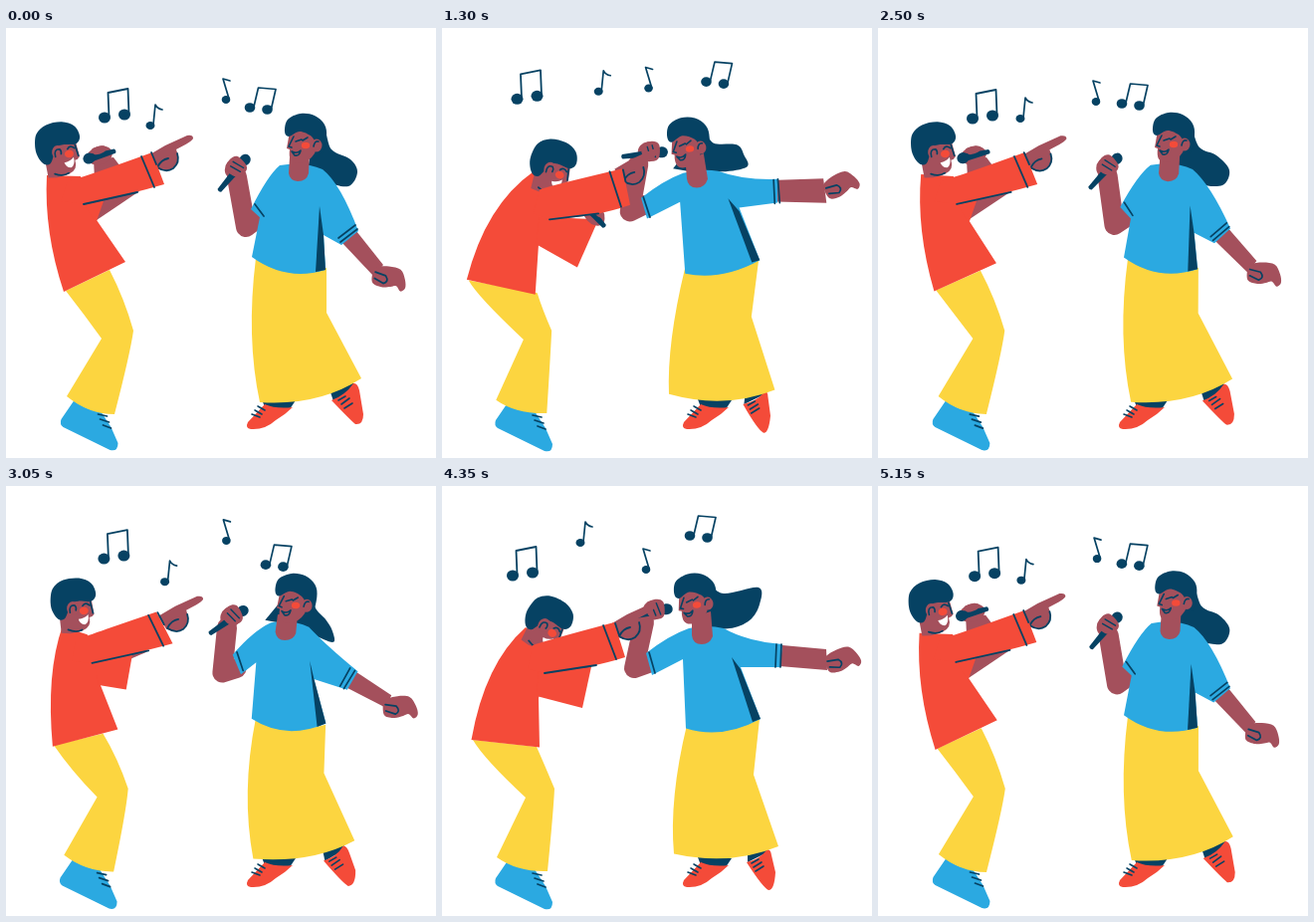
Animation, 432 px wide and 432 px high, one loop 5.2 s. Source, as an HTML page with a canvas:

```html
<!DOCTYPE html>
<html lang="en">
<head>
<meta charset="utf-8">
<title>Karaoke duet</title>
<style>
  html, body { margin: 0; width: 100%; height: 100%; overflow: hidden; background: #fff; }
  canvas { display: block; width: 100vw; height: 100vh; }
</style>
</head>
<body>
<canvas id="stage" width="432" height="432"></canvas>
<script>
const ctx = document.getElementById('stage').getContext('2d');
const SKIN = '#a4505c', NAVY = '#064263', RED = '#f44b39', BLUE = '#2ba9e1', YELLOW = '#fcd540';
const LOOP = 5200, STEPS = 74, SWAY = 37;
const KEYS = [0, 10, 13, 24, 27, 35];
const NUMBER = /-?\d+(\.\d+)?/g;

// Periodic cubic through uneven keys, with parabolic tangents.
function sample(values, step) {
  const n = values.length;
  const key = k => KEYS[(k + n) % n] + SWAY * Math.floor(k / n);
  const val = k => values[(k + n) % n];
  const slope = k => (val(k + 1) - val(k)) / (key(k + 1) - key(k));
  const tangent = k => {
    const before = key(k) - key(k - 1), after = key(k + 1) - key(k);
    return (after * slope(k - 1) + before * slope(k)) / (before + after);
  };
  let k = n - 1;
  while (key(k) > step) k--;
  const span = key(k + 1) - key(k), t = (step - key(k)) / span, u = 1 - t;
  return val(k) * u * u * (1 + 2 * t) + val(k + 1) * t * t * (3 - 2 * t)
    + span * t * u * (u * tangent(k) - t * tangent(k + 1));
}

// Three poses swing there and back; six poses use every key.
function morph(...poses) {
  if (poses.length === 3) poses = [...poses, poses[2], poses[1]];
  const rows = poses.map(p => p.match(NUMBER).map(Number));
  return step => {
    let n = 0;
    return poses[0].replace(NUMBER, () => {
      const c = n++;
      return sample(rows.map(r => r[c]), step).toFixed(2);
    });
  };
}

const numbers = text => text.match(NUMBER).map(Number);

// Closed smooth outline through a list of points.
function smooth(text) {
  const v = numbers(text), n = v.length / 2;
  const p = i => { const k = (i + n) % n; return [v[2 * k], v[2 * k + 1]]; };
  let d = 'M' + p(0);
  for (let i = 0; i < n; i++) {
    const [a, b, c, e] = [p(i - 1), p(i), p(i + 1), p(i + 2)];
    d += 'C' + [0, 1].map(j => b[j] + (c[j] - a[j]) / 6)
      + ' ' + [0, 1].map(j => c[j] - (e[j] - b[j]) / 6) + ' ' + c;
  }
  return d + 'Z';
}

function fill(color, d) {
  ctx.fillStyle = color;
  ctx.fill(new Path2D(d));
}
function line(color, width, d) {
  ctx.strokeStyle = color;
  ctx.lineWidth = width;
  ctx.stroke(new Path2D(d));
}
function oval(color, x, y, rx, ry = rx, turn = 0) {
  ctx.fillStyle = color;
  ctx.beginPath();
  ctx.ellipse(x, y, rx, ry, turn, 0, 7);
  ctx.fill();
}
function at(place, draw) {
  const [x, y, deg = 0] = numbers(place);
  ctx.save();
  ctx.translate(x, y);
  ctx.rotate(deg * Math.PI / 180);
  draw();
  ctx.restore();
}

const notes = {
  bigPair: morph('99 90', '92 62', '86 59', '71 90', '76 90', '95 91'),
  leftNote: morph('145 98', '168 86', '170 78', '139 57', '139 63', '143 91'),
  rightNote: morph('221 72', '218 45', '214 43', '205 84', '208 83', '219 74'),
  smallPair: morph('245 80', '272 72', '275 65', '249 50', '247 55', '245 76')
};

const woman = {
  head: morph('312 118 0', '285 121 0', '270 121 -4', '267 118 -8', '276 117 -8', '308 117 0'),
  hair: morph(
    '318 100 327 122 346 132 353 145 344 159 322 154 304 140',
    '290 100 291 120 298 132 309 142 318 152 296 147 270 140',
    '275 100 279 121 290 131 302 138 313 147 288 146 262 142',
    '262 98 283 108 318 102 319 119 309 135 289 143 266 138',
    '272 96 294 109 327 104 329 120 318 136 300 143 280 138',
    '312 98 323 120 340 128 353 143 346 158 322 156 302 140'),
  lock: morph(
    'M288 120L295 115 298 135Z', 'M237 145L257 118 262 142Z', 'M227 148L245 122 255 145Z',
    'M255 130L262 125 262 140Z', 'M265 130L270 125 270 138Z', 'M286 120L293 115 296 135Z'),
  neck: morph(
    'M285 130L305 124 304 146Q302 154 293 154 Q285 153 284 146Z',
    'M260 130L280 126 279 150Q276 157 268 157 Q259 157 258 148Z',
    'M251 132L270 126 272 151Q269 159 261 159 Q252 159 251 150Z'),
  shirt: morph(
    'M275 138Q263 148 246 182L258 193 256 185 247 230Q281 255 321 243L319 208 337 218 354 204Q336 156 318 142Q300 134 275 138Z',
    'M256 139Q235 146 212 164L218 188 246 173 246 239Q281 256 321 235L302 184 344 191 349 169Q310 160 291 142Q275 136 256 139Z',
    'M248 143Q228 150 205 168L211 190 242 174 245 243.5Q281 255 320 234L300 182 340 182 342 159Q306 156 283 143Q266 139 248 143Z'),
  shade: morph('M315 179L311 245 321 243 319 208Z', 'M296 173L313 239 321 235 302 184Z', 'M291 172L312 237 320 234 300 184Z'),
  cuffs: morph(
    'M250 177L259 189M351 198L334 211M353 202L336 215',
    'M216 163L221 185M340 168L336 190M346 169L341 191',
    'M208 167L214 188M336 159L335 182M341 159L340 182'),
  skirt: morph(
    'M251 231Q285 250 322 241L322 286 357 352Q314 380 255 376Q241 311 251 231Z',
    'M249 237Q285 250 320 237L316 290 343 360Q298 380 240 372Q231 310 249 237Z',
    'M246 240Q283 250 319 234L313 290 338 362Q290 382 233 369.5Q228 314 246 240Z'),
  sock: morph('M326 366L347 355 352 360 329 375Z', 'M311 368L329 362 333 367 312 378Z', 'M307 370L326 364 329 367 307 378Z'),
  shoe: morph(
    'M327 374Q341 369 349 357Q353 356 355 364L359 388Q359 399 351 398Q346 394 327 374Z',
    'M311 378Q324 375 330 365Q334 365 336 372L342 386Q342 404 335 405Q329 402 311 378Z',
    'M306 378Q319 375 326 366Q330 364 331 371L335 388Q334 406 328 406Q322 403 306 378Z'),
  laces: morph(
    'M334 374L341 370M337 378L345 372M340 382L348 377',
    'M316 379L323 375M318 383L326 378M321 387L329 382',
    'M311 379L318 375M313 383L321 378M315 387L323 382'),
  micArm: morph('M253 191L241 200 232 150', 'M214 178L199 181 211 137', 'M207 178L193 183 203 137'),
  mic: morph('233 141 -50', '222 126 -20', '215 126 -12'),
  arm: morph(
    'M337 215L352 204 379 238 369 249Z',
    'M344 190L348 170 390 182 388 198Z',
    'M339 181L342 160 386 164 387 185Z'),
  hand: morph('386 251 25', '404 190 -2', '402 168 -10', '403 174 -4', '404 190 -2', '389 247 20')
};

const man = {
  head: morph('52 124 -8', '86 125 0', '99 132 2', '103 139 29', '94 130 24', '56 124 -8'),
  torso: morph(
    'M41 148Q38 205 58 265L120 235 91 193 80 176 75 149Z',
    'M73 139Q42 178 36 258L104 255 97 207 100 182 92 152Z',
    'M84 142Q43 178 29.5 255L98 262.5 97 213 104 188 102 156Z'),
  sleeve: morph(
    'M62 154Q78 150 147 125L159 157Q125 167 78 177L55 174Z',
    'M81 157Q92 152 161 131L177 164Q145 173 97 182L78 180Z',
    'M91 160Q105 155 173 137L184 172Q150 183 103 188L86 184Z'),
  seams: morph(
    'M78 177L132 165M136 129L149 160M146 125L151 137',
    'M96 182L152 171M153 134L168 166M163 132L169 144',
    'M103 188L155 180M162 140L175 174M174 138L178 150'),
  backArm: morph(
    'M88 132L108 130 134 164 91 193Z', 'M125 165L150 165 148 172 115 178Z', 'M130 170L155 170 152 178 118 182Z',
    'M130 170L152 170 150 176 118 182Z', 'M125 163L145 163 143 171 115 176Z', 'M89 132L109 130 134 164 92 192Z'),
  backSleeve: morph(
    'M78 175L99 171 91 194 88 193Z', 'M96 181L149 170 137 220 96 208Z', 'M97 187L155 188 134 236 95 215Z',
    'M97 185L151 177 141 223 95 211Z', 'M96 181L146 171 141 211 95 207Z', 'M79 175L100 171 92 194 89 193Z'),
  mic: morph('94 128 -16', '140 176 -6', '148 186 42', '140 174 8', '125 166 0', '96 128 -14'),
  hand: morph('0 0', '20 7', '26 11'),
  pants: morph(
    'M60 264L104 243Q119 272 128 304 Q125 326 109 388Q83 388 61 370L96 312Q78 287 60 264Z',
    'M37 257L94 256Q106 276 117 304 Q116 326 107 387Q78 388 56 372L87 313Q51 280 37 257Z',
    'M31 255L95 262Q103 280 113 304 Q112 326 106 387Q76 388 55 373L84 313Q42 274 31 255Z'),
  shoe: morph('1.5 -1', '0 0', '0 0')
};

function mic(head, tail) {
  const s = Math.sign(tail);
  fill(NAVY, `M${head} -4L${tail} -2.3Q${tail + s * 2} 0 ${tail} 2.3L${head} 4Z`);
  oval(NAVY, head, 0, 6, 5.5);
}

function drawNotes(step) {
  at(notes.bigPair(step), () => {
    oval(NAVY, 0, 0, 6, 5.5);
    oval(NAVY, 20, -3, 6, 5.5);
    line(NAVY, 1.8, 'M4.5 -1L3.5 -25 23.5 -29 24.5 -4');
  });
  at(notes.leftNote(step), () => {
    oval(NAVY, 0, 0, 4.5, 4);
    line(NAVY, 1.7, 'M3 -1L5 -21Q7 -17 12 -16');
  });
  at(notes.rightNote(step), () => {
    oval(NAVY, 0, 0, 4.3, 4);
    line(NAVY, 1.7, 'M3 -1L-3 -21 4 -19');
  });
  at(notes.smallPair(step), () => {
    oval(NAVY, 0, 0, 5.3, 4.8);
    oval(NAVY, 17.5, 2, 5.3, 4.8);
    line(NAVY, 1.7, 'M4 -1L8.5 -20 26 -18.5 21.5 1');
  });
}

function womanHead() {
  fill(SKIN, 'M-27 -14L-30 3 -27 4Q-29 18 -19 18Q-8 18 -2 8L5 -8 -4 -18Z');
  oval(RED, -11, 0, 4.2, 3.2);
  fill(NAVY, smooth('-32 -14 -29 -26 -16 -32 -2 -30 8 -21 10 -9 6 8 0 0 -5 -9 -17 -14 -28 -9'));
  oval(SKIN, 0, 0, 5.5, 6.5);
  line(NAVY, 1.6, 'M-3 1Q-2 -5 2 -4M-23 -9L-28 1 -25 2M-21 -4L-15 -6M-14 -5L-9 -8M-25 6Q-20 9 -16 5Q-17 11 -22 10Z');
}

function drawWoman(step) {
  fill(NAVY, smooth(woman.hair(step)));
  fill(NAVY, woman.lock(step));
  fill(NAVY, 'M257 373L291 374 285 383 260 381Z');
  fill(RED, 'M260 378Q271 383 288 381Q281 388 271 394Q260 404 246 403Q240 402 243 396Z');
  line(NAVY, 1.6, 'M253 380L260 384M250 384L257 388M247 388L255 391');
  fill(NAVY, woman.sock(step));
  fill(RED, woman.shoe(step));
  line(NAVY, 1.6, woman.laces(step));
  fill(YELLOW, woman.skirt(step));
  fill(SKIN, woman.arm(step));
  at(woman.hand(step), () => {
    fill(SKIN, smooth('-17 -4 -6 -10 6 -12 14 -5 18 3 15 8 9 5 4 8 -4 12 -14 12 -18 3'));
    line(NAVY, 1.7, 'M-16 1L-5 0Q1 4 -4 8L-14 7');
  });
  line(SKIN, 20, woman.micArm(step));
  fill(BLUE, woman.shirt(step));
  fill(NAVY, woman.shade(step));
  line(NAVY, 1.7, woman.cuffs(step));
  fill(SKIN, woman.neck(step));
  at(woman.head(step), womanHead);
  at(woman.mic(step), () => {
    oval(SKIN, -2, -2, 11, 10);
    mic(11, -29);
    fill(SKIN, smooth('-8 -9 2 -12 9 -8 8 4 3 8 -5 6 -9 0'));
    line(NAVY, 1.4, 'M-3 -7L-1 4M2 -8L4 4');
  });
}

function manHead() {
  fill(SKIN, 'M-8 -8L19 -8 21 8Q19 11 16 11Q18 21 8 24L-4 26 -13 25 -14 4Z');
  oval(RED, 11, 4, 4.5, 3.8);
  fill('#fff', 'M5 12Q11 12 15 8Q16 16 11 18Q6 17 5 12Z');
  line(NAVY, 1.7, 'M-6 22Q2 26 8 23M10 -1Q13 -5 17 -1M18 -4L20 7');
  fill(NAVY, smooth('-22 -6 -19 -20 -8 -28 8 -29 20 -23 24 -12 19 -5 6 -6 -2 -4 -5 4 -9 11 -15 11 -20 4'));
  oval(SKIN, 0, 1, 6, 7);
  line(NAVY, 1.6, 'M-3 5Q-4 -3 2 -2Q4 0 3 3');
}

function drawMan(step) {
  at(man.shoe(step), () => {
    fill(BLUE, 'M67 375Q80 386 93 385L104 402 111 418Q111 427 103 425L56 402Q52 399 54 394Z');
    line(NAVY, 1.7, 'M91 389L100 391M93 394L102 397M96 400L104 403');
  });
  fill(YELLOW, man.pants(step));
  fill(RED, man.torso(step));
  at(man.head(step), manHead);
  fill(SKIN, man.backArm(step));
  fill(RED, man.backSleeve(step));
  at(man.mic(step), () => {
    oval(SKIN, 0, 0, 13, 9);
    mic(-11, 16);
    fill(SKIN, smooth('-6 -8 4 -9 9 -6 5 -2 -4 -2'));
  });
  at(man.hand(step), () => {
    fill(SKIN, 'M143 128L160 118 182 108Q188 107 188 111Q187 114 171 122Q176 134 169 140Q162 146 151 141Z');
    line(NAVY, 1.8, 'M152 140Q161 146 168 141Q175 135 172 126M152 140Q156 132 163 131');
  });
  fill(RED, man.sleeve(step));
  line(NAVY, 1.8, man.seams(step));
}

function draw(time) {
  const tick = Math.floor((time % LOOP) / 50) * 50;
  const step = Math.floor(tick * STEPS / LOOP) % SWAY;
  ctx.clearRect(0, 0, 432, 432);
  drawNotes(step);
  drawWoman(step);
  drawMan(step);
}

ctx.lineJoin = ctx.lineCap = 'round';
const start = performance.now();
function play() {
  draw(performance.now() - start);
  requestAnimationFrame(play);
}
play();
</script>
</body>
</html>
```
